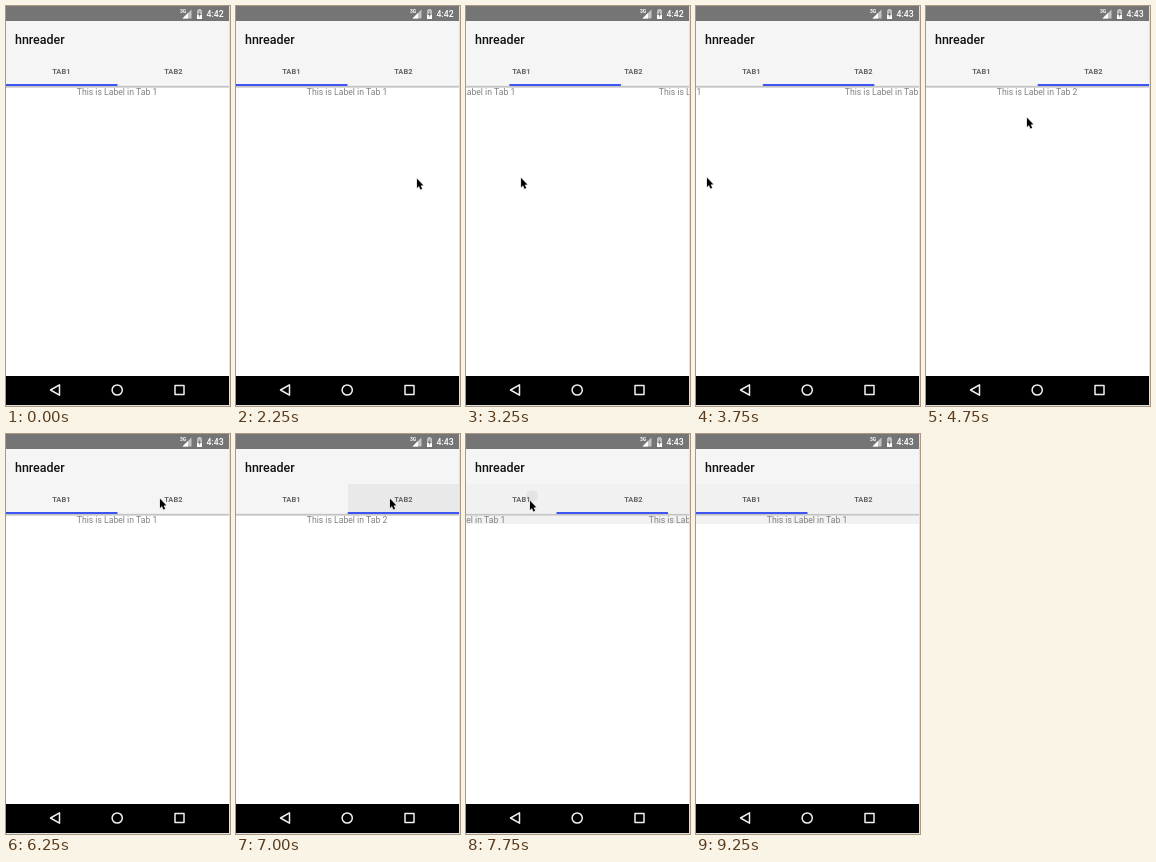
Animation of 224 by 400 pixels, one loop 9500 ms. Source, as an HTML page with a canvas:

```html
<!DOCTYPE html>
<html lang="en">
<head>
<meta charset="utf-8">
<title>Tab pager</title>
<style>
html, body { margin: 0; width: 100%; height: 100%; overflow: hidden; background: #fff; }
canvas { display: block; width: 224px; height: 400px; }
</style>
</head>
<body>
<canvas id="stage"></canvas>
<script>
const W = 224, H = 400, LOOP = 9500, STEP = 250;
const SLOP = 24, TAP_TIME = 250;
const canvas = document.getElementById('stage');
const dpr = window.devicePixelRatio || 1;
canvas.width = W * dpr;
canvas.height = H * dpr;
const ctx = canvas.getContext('2d');
ctx.scale(dpr, dpr);

const glide = (start, ms, x, y) => ({ start, ms, x, y });
const swipe = (start, release, to) => ({ start, release, to });
const tap = (start, to) => ({ start, to, tap: true });

// The pointer eases from each stop to the next
const entry = { x: 165, y: 51 };
const glides = [
  glide(750, 500, 176, 69),
  glide(2000, 250, 181, 172),
  glide(2250, 1500, 11, 171),
  glide(3750, 500, 41, 124),
  glide(4500, 250, 101, 111),
  glide(5000, 500, 190, 156),
  glide(5500, 250, 140, 103),
  glide(5750, 500, 154, 64),
  glide(7250, 250, 64, 66)
];
const moves = [swipe(2250, 3750, 1), swipe(5000, 5500, 0), tap(6625, 1), tap(7625, 0)];

const clamp = v => Math.min(1, Math.max(0, v));
const smooth = v => { const k = clamp(v); return k * k * (3 - 2 * k); };

function pointerAt(t) {
  let { x, y } = entry;
  for (const g of glides) {
    const k = smooth((t - g.start) / g.ms);
    x += (g.x - x) * k;
    y += (g.y - y) * k;
  }
  return { x, y };
}

function swipeProgress(move, t) {
  const held = Math.min(t, move.release);
  const travel = Math.abs(pointerAt(held).x - pointerAt(move.start).x);
  const drag = Math.max(0, travel - SLOP) / W;
  return 1 - (1 - drag) * Math.exp((held - t) / 45);
}

// Scroll of the pages and of the indicator, which lags behind; 0 to 1
function pagerAt(t) {
  const move = moves.filter(m => m.start <= t).pop();
  if (!move) return { page: 0, mark: 0 };
  const k = move.tap ? smooth((t - move.start) / TAP_TIME) : swipeProgress(move, t);
  const lagged = k ** (move.tap ? 2.4 : 1.2);
  return move.to ? { page: k, mark: lagged } : { page: 1 - k, mark: 1 - lagged };
}

function rect(x, y, w, h, color) {
  ctx.fillStyle = color;
  ctx.fillRect(x, y, w, h);
}

function text(str, x, y, size, weight, color, align = 'left') {
  ctx.font = `${weight} ${size}px Roboto, sans-serif`;
  ctx.textAlign = align;
  ctx.fillStyle = color;
  ctx.fillText(str, x, y);
}

function poly(...points) {
  ctx.beginPath();
  points.forEach(([x, y]) => ctx.lineTo(x, y));
  ctx.closePath();
}

function statusBar(t) {
  rect(0, 0, W, 15, '#757575');
  text('3G', 174, 7, 5, 700, '#fff');
  ctx.fillStyle = '#c4c4c4';
  poly([185.5, 3.5], [185.5, 12.5], [176.5, 12.5]);
  ctx.fill();
  ctx.fillStyle = '#fff';
  poly([182, 7], [182, 12.5], [176.5, 12.5]);
  ctx.fill();
  rect(192, 3, 3, 1, '#bdbdbd');
  rect(191, 4, 5, 5, '#bdbdbd');
  rect(191, 9, 5, 4, '#fff');
  ctx.fillStyle = '#757575';
  poly([194, 5.5], [192, 9], [193.2, 9], [193, 11.5], [195, 8], [193.9, 8]);
  ctx.fill();
  text(t < 3500 ? '4:42' : '4:43', 200.5, 11.2, 8.7, 500, '#fff');
}

function ripple(move, t) {
  const age = t - move.start;
  if (age < 0) return;
  const { x, y } = pointerAt(t);
  ctx.save();
  ctx.beginPath();
  ctx.rect(move.to * W / 2, 50, W / 2, 30);
  ctx.clip();
  ctx.fillStyle = `rgba(0,0,0,${0.05 * clamp((875 - age) / 500)})`;
  ctx.beginPath();
  ctx.arc(x + 2, y - 4, 6 + Math.max(0, age - 125) / 2, 0, Math.PI * 2);
  ctx.fill();
  ctx.restore();
}

function content(t, page) {
  rect(0, 80, W, 290, '#fff');
  if (t >= 7750) rect(0, 80, W, 10, '#f2f2f2');
  for (let i = 0; i < 2; i++) {
    text(`This is Label in Tab ${i + 1}`, 111 + (i - page) * W, 89.3, 8.65, 400, '#808080', 'center');
  }
}

function header(t, mark) {
  rect(0, 15, W, 65, '#f5f5f5');
  if (t >= 7750) rect(0, 50, W, 30, '#f1f1f1');
  moves.filter(m => m.tap).forEach(m => ripple(m, t));
  text('hnreader', 9, 37.6, 12.44, 500, '#111', 'left');
  for (let i = 0; i < 2; i++) {
    text(`TAB${i + 1}`, 55.3 + i * W / 2, 68, 7.47, 700, '#666', 'center');
  }
  ['#ececec', '#c4c4c4', '#d8d8d8'].forEach((color, i) => rect(0, 79 + i, W, 1, color));
  rect(mark * 111.7, 78, 111.5, 2, '#3f55f2');
}

function navBar() {
  rect(0, 370, W, 30, '#000');
  ctx.strokeStyle = '#f0f0f0';
  ctx.lineWidth = 1.5;
  ctx.lineJoin = 'round';
  poly([44.5, 384], [53.5, 378.8], [53.5, 389.2]);
  ctx.stroke();
  ctx.beginPath();
  ctx.arc(111.2, 384, 5.1, 0, Math.PI * 2);
  ctx.stroke();
  ctx.strokeRect(169, 379.5, 9, 9);
}

function windowEdge() {
  rect(W - 1, 0, 1, H, '#e0e0e0');
  rect(0, H - 1, W, 1, '#e0e0e0');
}

function arrow({ x, y }) {
  ctx.save();
  ctx.translate(x, y + 0.7);
  ctx.scale(0.86, 0.9);
  poly([0, 0], [0, 10.2], [2.3, 8.2], [4, 12], [5.9, 11.2], [4.2, 7.5], [7.2, 7.3]);
  ctx.strokeStyle = '#ddd';
  ctx.lineWidth = 1.6;
  ctx.lineJoin = 'round';
  ctx.stroke();
  ctx.fillStyle = '#000';
  ctx.fill();
  ctx.restore();
}

function draw(t) {
  const { page, mark } = pagerAt(t);
  content(t, page);
  header(t, mark);
  statusBar(t);
  navBar();
  windowEdge();
  if (t >= 750 && t < 8500) arrow(pointerAt(t));
}

const start = performance.now();
function frame() {
  const t = (performance.now() - start) % LOOP;
  draw(Math.floor(t / STEP) * STEP);
  requestAnimationFrame(frame);
}
frame();
</script>
</body>
</html>
```
